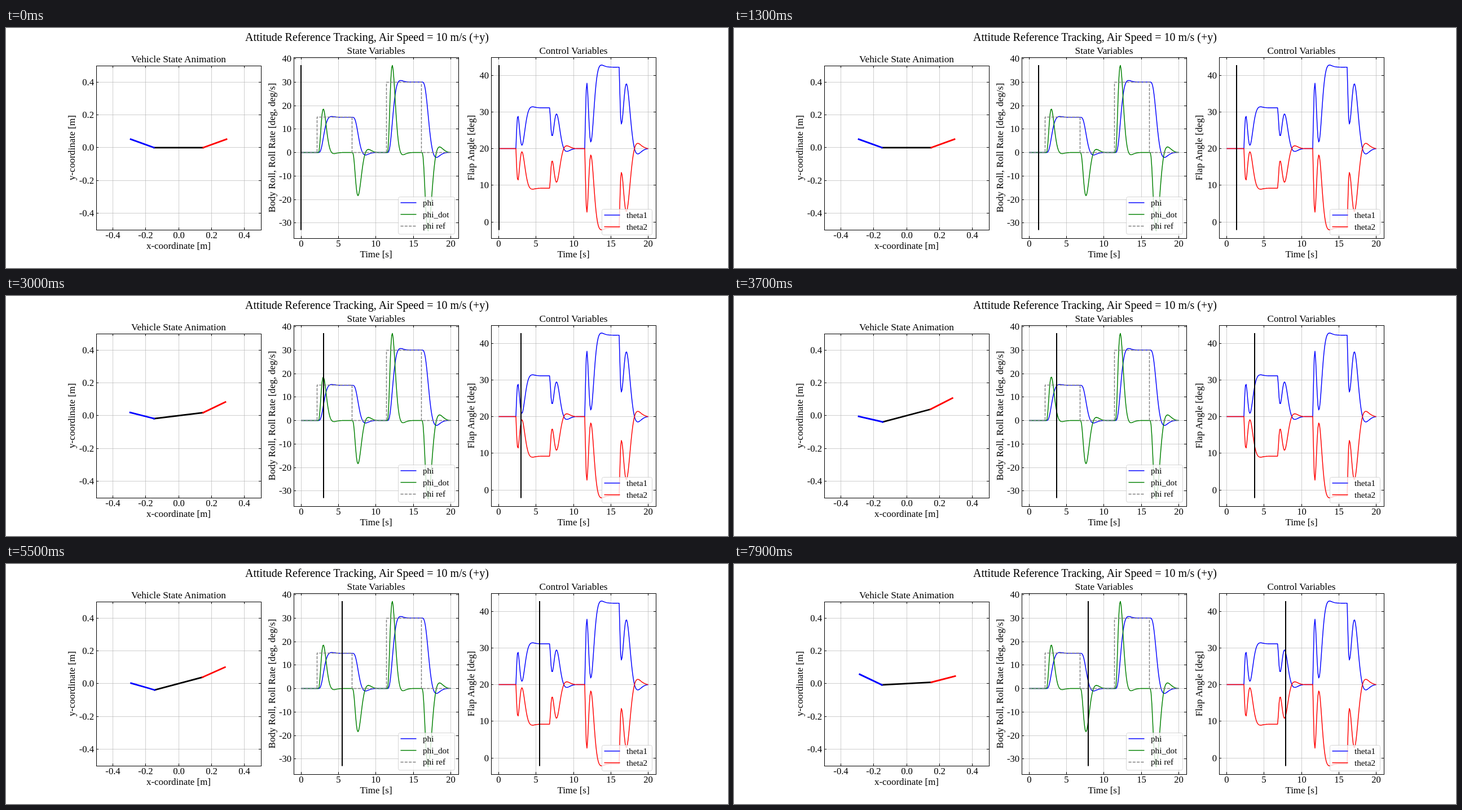
An HTML page for the animation above (8000 ms loop, 1280 by 427 pixels).

```html
<!DOCTYPE html>
<html lang="en">
<head>
<meta charset="utf-8">
<title>Attitude Reference Tracking</title>
<style>
  html, body { margin: 0; width: 100%; height: 100%; overflow: hidden; background: #fff; }
  svg { display: block; width: 100%; height: 100%; }
  text { font-family: "Liberation Serif", "Times New Roman", serif; fill: #000; }
  path, line { fill: none; }
</style>
</head>
<body>
<svg id="stage" viewBox="0 0 1280 427"></svg>
<script>
const stage = document.getElementById('stage');
const LOOP = 8000, STEP = 100, DURATION = 20, DT = .1;

// Each roll command: when the body reacts, roll change, decay, frequency, initial flap kick
const commands = [
  { start: 2.3, change: 15, decay: 3.77, freq: 1.765, kick: 2.5 },
  { start: 6.85, change: -15, decay: 3.1, freq: 1.79, kick: -2.5 },
  { start: 11.52, change: 30, decay: 3.77, freq: 1.765, kick: 5 },
  { start: 16.15, change: -30, decay: 2.82, freq: 1.627, kick: -9 }
];
const total = fn => commands.reduce((sum, c) => sum + fn(c), 0);

// s^2 e^(-as) sin(ws), scaled so that its whole area is the commanded change
const rollRate = t => total(({ start, change, decay, freq }) => {
  const s = Math.max(0, t - start);
  const area = 2 * Math.sin(3 * Math.atan2(freq, decay)) / Math.hypot(decay, freq) ** 3;
  return change / area * s * s * Math.exp(-decay * s) * Math.sin(freq * s);
});
const flapKick = t => total(({ start, kick }) => {
  const s = Math.max(0, t - start) / .13;
  return kick * s * Math.exp(1 - s);
});

// Integrate the rate to roll; flaps balance wind, damping and roll acceleration
function simulate() {
  const samples = [], substeps = 10, h = DT / substeps;
  let phi = 0;
  for (let i = 0; i <= DURATION / DT; i++) {
    const t = i * DT, phiDot = rollRate(t);
    const acceleration = (rollRate(t + .02) - rollRate(t - .02)) / .04;
    const flap = .74 * phi - .165 * phiDot + .165 * acceleration + flapKick(t);
    samples.push({ t, phi, phiDot, theta1: 20 + flap, theta2: 20 - .973 * flap });
    for (let k = 0; k < substeps; k++) phi += h * rollRate(t + (k + .5) * h);
  }
  return samples;
}
const samples = simulate();

const line = (x1, y1, x2, y2, color, width, extra = '') =>
  `<line x1="${x1}" y1="${y1}" x2="${x2}" y2="${y2}" stroke="${color}" stroke-width="${width}" ${extra}/>`;
const text = (x, y, size, str, anchor = 'middle', extra = '') =>
  `<text x="${x}" y="${y}" font-size="${size}" text-anchor="${anchor}" ${extra}>${str}</text>`;
const path = (points, color, extra = '') =>
  `<path d="M${points.map(p => p.map(n => n.toFixed(2)).join()).join('L')}" stroke="${color}" stroke-width="1.45" stroke-linejoin="round" ${extra}/>`;
const snap = n => Math.floor(n) + .5;
const range = (from, to, step) =>
  Array.from({ length: Math.round((to - from) / step) + 1 }, (_, i) => from + i * step);
const DASH = 'stroke-dasharray="5.1 2.2"';

const vehicle = {
  left: 160, right: 452, top: 67, bottom: 359, title: 'Vehicle State Animation',
  xLabel: 'x-coordinate [m]', yLabel: 'y-coordinate [m]', yLabelX: 122, digits: 1,
  xTicks: range(-.4, .4, .2), yTicks: range(-.4, .4, .2),
  x: v => 306 + 291.8 * v, y: v => 212.8 - 291.8 * v
};
const states = {
  left: 510, right: 802, top: 52, bottom: 374, title: 'State Variables',
  xLabel: 'Time [s]', yLabel: 'Body Roll, Roll Rate [deg, deg/s]', yLabelX: 477, digits: 0,
  xTicks: range(0, 20, 5), yTicks: range(-30, 40, 10),
  x: t => 523.25 + 13.26 * t, y: v => 221.5 - 4.175 * v
};
const controls = {
  left: 860, right: 1152, top: 52, bottom: 374, title: 'Control Variables',
  xLabel: 'Time [s]', yLabel: 'Flap Angle [deg]', yLabelX: 830, digits: 0,
  xTicks: range(0, 20, 5), yTicks: range(0, 40, 10),
  x: t => 873.5 + 13.26 * t, y: v => 345 - 6.525 * v
};
const panels = [vehicle, states, controls];

function grid(p) {
  const rule = (...ends) => line(...ends, '#b0b0b0', 1, 'opacity=".6"');
  return p.xTicks.map(v => rule(snap(p.x(v)), p.top, snap(p.x(v)), p.bottom)).join('')
    + p.yTicks.map(v => rule(p.left, snap(p.y(v)), p.right, snap(p.y(v)))).join('');
}

function tickLabel(value, digits) {
  const label = value.toFixed(digits);
  return Number(label) === 0 ? label.replace('-', '') : label;
}

function frame(p) {
  const { left, right, top, bottom } = p, middle = (left + right) / 2, center = (top + bottom) / 2;
  let out = `<rect x="${left + .5}" y="${top + .5}" width="${right - left}" height="${bottom - top}" fill="none" stroke="#000"/>`;
  for (const v of p.xTicks) {
    const x = snap(p.x(v));
    out += line(x, top, x, top + 4, '#000', 1) + line(x, bottom - 4, x, bottom, '#000', 1)
      + text(x, bottom + 15, 16.6, tickLabel(v, p.digits));
  }
  for (const v of p.yTicks) {
    const y = snap(p.y(v));
    out += line(left, y, left + 4, y, '#000', 1) + line(right - 4, y, right, y, '#000', 1)
      + text(left - 4, y + 5.5, 16.6, tickLabel(v, p.digits), 'end');
  }
  return out + text(middle, top - 6, 17.3, p.title) + text(middle, bottom + 33.5, 16.9, p.xLabel)
    + text(0, 0, 17.2, p.yLabel, 'middle', `transform="translate(${p.yLabelX} ${center}) rotate(-90)"`);
}

const plot = (p, key, color) => path(samples.map(s => [p.x(s.t), p.y(s[key])]), color);

function legend(x, y, width, rows) {
  return `<rect x="${x + .5}" y="${y + .5}" width="${width}" height="${rows.length * 20.8 + 4}" rx="3" fill="#fff" stroke="#ccc" opacity=".8"/>`
    + rows.map(([label, color, extra], i) => {
      const rowY = y + 10.8 + i * 20.8;
      return line(x + 4.5, rowY, x + 32.5, rowY, color, 1.45, extra) + text(x + 44, rowY + 5, 15.2, label, 'start');
    }).join('');
}

// Two square pulses
function reference() {
  const points = [[0, 0]];
  for (const [on, off, level] of [[2.15, 6.8, 15], [11.4, 16.05, 30]]) {
    points.push([on, 0], [on, level], [off, level], [off, 0]);
  }
  points.push([DURATION, 0]);
  return path(points.map(([t, v]) => [snap(states.x(t)), snap(states.y(v))]), '#808080', DASH);
}

const member = (id, color) => line(0, 0, 0, 0, color, 2.8, `id="${id}" stroke-linecap="square"`);
const cursor = id => line(0, 66, 0, 359.5, '#000', 2, `id="${id}"`);

stage.innerHTML = '<rect width="1280" height="427" fill="#fff"/>'
  + panels.map(grid).join('')
  + plot(states, 'phi', '#00f') + plot(states, 'phiDot', '#008000') + reference()
  + plot(controls, 'theta1', '#00f') + plot(controls, 'theta2', '#f00')
  + member('body', '#000') + member('leftFlap', '#00f') + member('rightFlap', '#f00')
  + cursor('stateCursor') + cursor('controlCursor')
  + panels.map(frame).join('')
  + legend(695, 300, 100, [['phi', '#00f'], ['phi_dot', '#008000'], ['phi ref', '#808080', DASH]])
  + legend(1056, 322, 89, [['theta1', '#00f'], ['theta2', '#f00']])
  + text(640, 23, 20, 'Attitude Reference Tracking, Air Speed = 10 m/s (+y)');

const part = Object.fromEntries([...stage.querySelectorAll('[id]')].map(el => [el.id, el]));

function setEnds(el, [x1, y1], [x2, y2]) {
  Object.entries({ x1, y1, x2, y2 }).forEach(([name, value]) => el.setAttribute(name, value));
}

function offset([x, y], degrees) {
  const a = degrees * Math.PI / 180, length = 43.8;
  return [x + length * Math.cos(a), y - length * Math.sin(a)];
}

function draw(now) {
  const { t, phi, theta1, theta2 } = samples[Math.floor(now % LOOP / STEP)];
  const center = [vehicle.x(0), vehicle.y(0)];
  const left = offset(center, phi + 180), right = offset(center, phi);
  setEnds(part.body, left, right);
  setEnds(part.leftFlap, left, offset(left, phi + 180 - theta1));
  setEnds(part.rightFlap, right, offset(right, phi + theta2));
  for (const [el, p] of [[part.stateCursor, states], [part.controlCursor, controls]]) {
    const x = Math.round(p.x(t));
    setEnds(el, [x, 66], [x, 359.5]);
  }
  requestAnimationFrame(draw);
}
draw(performance.now());
</script>
</body>
</html>
```
